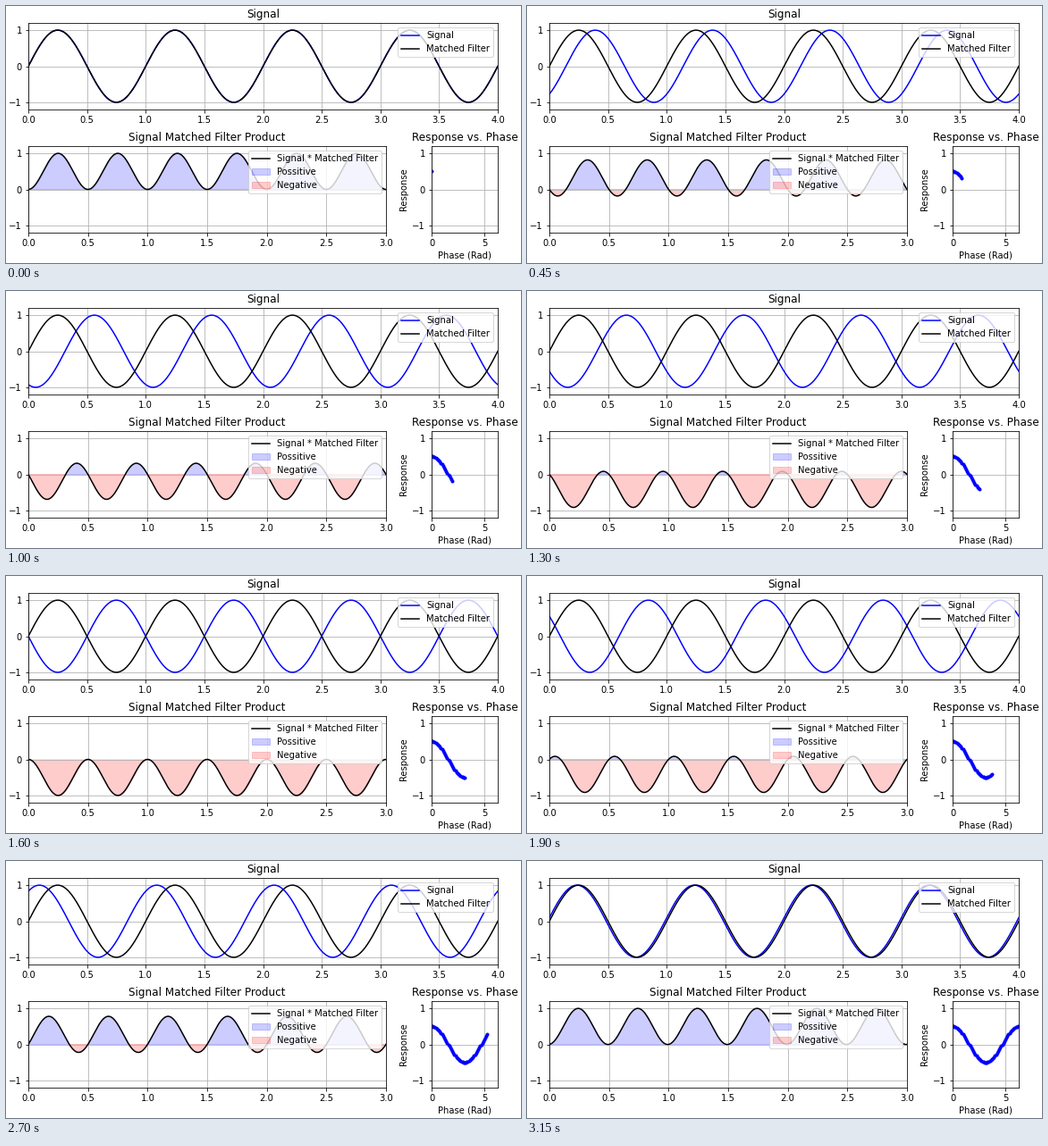
These frames come from a looping animation (576x288 px, 3.2 s). A matplotlib script:

```python
import numpy as np
import matplotlib.pyplot as plt
from matplotlib.animation import FuncAnimation

W, H, DPI = 576, 288, 72
FRAMES, INTERVAL = 64, 50

plt.rcParams.update({"font.family": "DejaVu Sans", "font.size": 10})
fig = plt.figure(figsize=(W / DPI, H / DPI), dpi=DPI, facecolor="white")


def make_axes(left, top, right, bottom, title, xmax):
    """Add axes whose edges are given in pixels from the top left."""
    ax = fig.add_axes([left / W, 1 - bottom / H,
                       (right - left) / W, (bottom - top) / H])
    ax.set(xlim=(0, xmax), ylim=(-1.2, 1.2), title=title)
    ax.grid(True)
    return ax


ax_sig = make_axes(25, 19, 550, 116, "Signal", 4)
ax_prod = make_axes(25, 157, 425, 254, "Signal Matched Filter Product", 3)
ax_resp = make_axes(476, 157, 550, 254, "Response vs. Phase", 2 * np.pi)
ax_resp.set(xlabel="Phase (Rad)", ylabel="Response")

t = np.linspace(0, 4, 1000)
matched = np.sin(2 * np.pi * t)
phases = 2 * np.pi * np.arange(FRAMES) / FRAMES
response = 0.5 * np.cos(phases)

signal_line, = ax_sig.plot(t, matched, "b", label="Signal")
ax_sig.plot(t, matched, "k", label="Matched Filter")
product_line, = ax_prod.plot(t, matched ** 2, "k",
                             label="Signal * Matched Filter")
dots, = ax_resp.plot([], [], "b.")


def shade(product):
    """Fill the positive and negative lobes of the product."""
    return [
        ax_prod.fill_between(t, product, 0, where=mask, color=color,
                             alpha=0.2, label=label)
        for mask, color, label in ((product > 0, "b", "Possitive"),
                                   (product < 0, "r", "Negative"))
    ]


fills = shade(matched ** 2)
ax_sig.legend(loc="upper right")
ax_prod.legend(loc="upper right")


def update(i):
    signal = np.sin(2 * np.pi * t - phases[i])
    product = signal * matched
    signal_line.set_ydata(signal)
    product_line.set_ydata(product)
    for fill in fills:
        fill.remove()
    fills[:] = shade(product)
    dots.set_data(phases[:i + 1], response[:i + 1])
    return [signal_line, product_line, dots, *fills]


anim = FuncAnimation(fig, update, frames=FRAMES, interval=INTERVAL,
                     init_func=lambda: update(0), repeat=True,
                     repeat_delay=0, blit=False)
plt.show()
```
